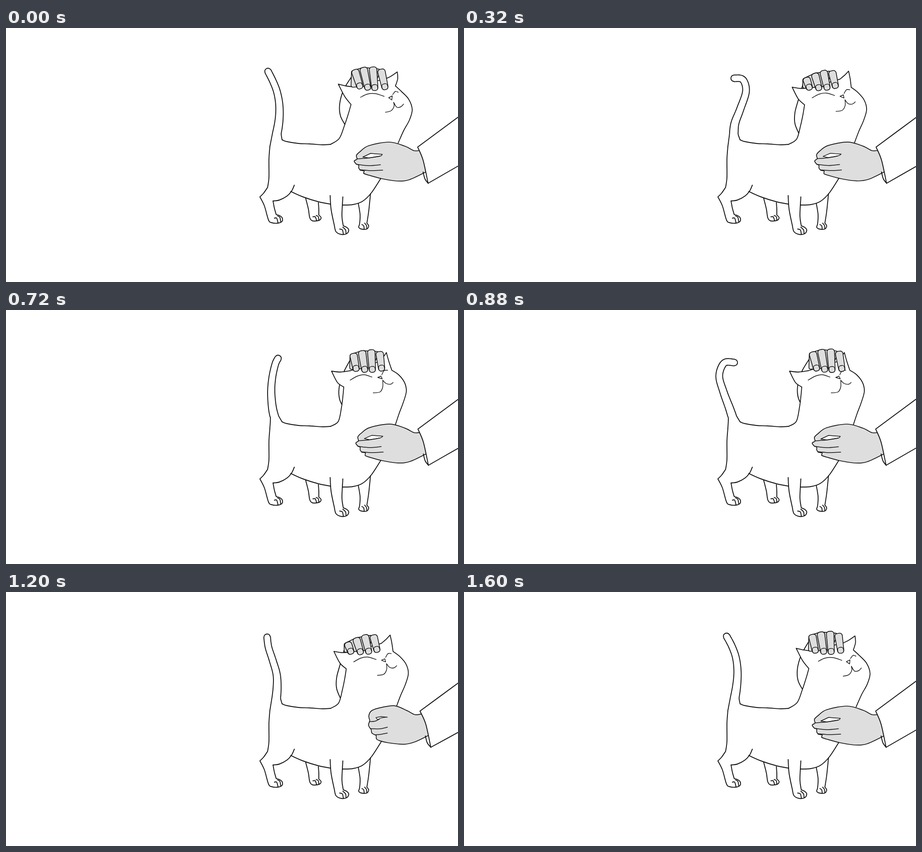
An HTML page with a canvas for the animation above (1.68 s loop, 997 px wide and 561 px high).

```html
<!DOCTYPE html>
<html lang="en">
<head>
<meta charset="utf-8">
<title>Cat being petted</title>
<style>
html, body { margin: 0; width: 100%; height: 100%; overflow: hidden; background: #fff; }
canvas { display: block; }
</style>
</head>
<body>
<canvas id="stage" width="997" height="561"></canvas>
<script>
const ctx = document.getElementById("stage").getContext("2d");
const INK = "#111", SKIN = "#dedede", PAPER = "#fff";
const LOOP = 1680, STEP = 80, PET = LOOP / 2;

// "x,y x,y | x,y": smooth runs of points, "|" marks a corner
const parse = s => s.split("|").map(run =>
  run.trim().split(/\s+/).map(p => p.split(",").map(Number)));
const pair = (from, to) => [parse(from), parse(to)];

const mix = (a, b, k) => Array.isArray(a)
  ? a.map((v, i) => mix(v, b[i], k))
  : a + (b - a) * k;
const ramp = (a, b, t) => Math.min(1, Math.max(0, (t - a) / (b - a)));
const ease = (a, b, t) => (1 - Math.cos(Math.PI * ramp(a, b, t))) / 2;

const body = [
  "582,262 580,290 580,330 577,352 | 568,365 560,373 | 570,393 579,424 586,430 600,431 609,427 609,419 603,414 596,412 | 592,398 589,382",
  "589,382 603,380 620,371 630,360 636,347",
  "592,420 597,420 600,430", "599,415 604,418 606,428",
  "609,247 620,251 645,255 670,256 698,258 716,257",
  "628,361 655,373 690,384 716,389",
  "742,391 765,390 786,383 806,364 830,327",
  "661,376 667,400 670,419 676,426 690,425 695,419 690,413 | 690,400 689,386",
  "677,417 682,417 685,425", "684,414 689,417 690,424",
  "715,370 717,400 724,435 728,450 740,456 752,454 756,446 751,440 744,437 | 741,415 743,373",
  "736,444 742,446 744,455", "743,440 749,446 750,454",
  "777,387 781,412 780,432 778,440 784,444 796,444 800,437 796,431 | 800,405 804,366",
  "785,434 789,437 790,444", "791,431 795,436 796,443"
].map(parse);

// Head turned right and left
const skull = pair(
  "716,257 735,244 746,217 755,190 761,169 | 747,151 733,124 | 750,128 766,130 | 838,112 | 850,106 863,97 | 864,112 859,128 | 872,140 888,157 896,180 890,203 877,227 865,254",
  "716,257 733,246 740,215 743,192 745,170 | 731,160 718,135 | 738,137 760,134 | 823,114 | 832,104 839,94 | 844,112 851,133 | 866,143 879,160 883,180 876,205 867,229 859,253");
const face = [
  pair("782,153 797,146 815,145 834,151", "759,155 775,146 790,143 807,148"),
  pair("853,147 859,140 865,142", "829,143 834,134 842,133"),
  pair("844,154 | 852,150 | 851,159 | 844,154", "820,149 | 827,146 | 830,152 | 820,149"),
  pair("837,186 849,183 856,173 855,164 | 862,175 871,174 877,168",
    "810,183 825,181 831,170 831,155 | 838,162 848,164 854,160")
];

// Stroking hand, forward and back
const arm = pair("762,108 745,136 736,168 738,195 752,220", "748,118 737,160 729,190 729,215 740,242");
const roots = pair("769,92 788,87 809,86 827,91", "752,112 771,102 790,95 809,95");
const tips = pair("782,134 799,137 814,138 837,136", "762,137 783,138 801,137 819,133");
const heel = pair("761,131", "745,134");

// Lower hand, open and closed
const fist = pair(
  "916,270 900,271 880,261 845,252 800,260 781,273 773,281 774,287 | 774,290 768,294 773,301 | 778,303 778,309 781,314 | 790,316 789,321 800,325 830,333 863,338 890,335 928,317",
  "921,268 903,271 885,262 858,251 825,256 810,261 805,272 807,282 | 807,284 805,294 809,302 | 810,303 812,312 820,316 | 821,317 822,325 828,329 845,333 881,336 905,330 936,315");
const gap = pair("787,285 | 804,277 | 830,279 | 825,283 800,287 | 787,285",
  "821,276 | 832,275 | 843,276 | 830,277 823,281 | 821,276");
const creases = [
  pair("774,289 800,287 825,283", "807,286 817,285 824,280"),
  pair("773,301 800,304 826,302", "809,302 828,302 844,298"),
  pair("781,313 805,315 831,314", "820,316 832,314 843,311")
];
const sleeve = pair("997,197 | 908,263 | 920,292 931,343 | 997,305", "997,202 | 914,263 | 927,292 938,343 | 997,311");
const lining = pair("920,318 924,333 931,343", "926,318 930,333 938,343");

// Middle line of the tail above its base
const TAIL_BASE = [595, 246];
const tailKeys = [
  [0, "602,206 603,172 598,142 589,118 578,96"],
  [320, "597,213 609,180 622,140 615,114 596,111"],
  [560, "590,218 598,182 612,152 614,122 604,98"],
  [880, "586,218 572,180 563,145 574,117 596,116"],
  [1200, "598,212 597,182 588,150 579,122 576,100"],
  [1440, "600,212 604,182 603,150 594,122 582,102"]
].map(([t, s]) => [t, parse(s)[0]]);
tailKeys.push([LOOP, tailKeys[0][1]]);

// Bezier control points for the stretch from p[i] to p[i + 1]
function stretch(p, i) {
  const b = p[i], c = p[i + 1], a = p[i - 1] || b, d = p[i + 2] || c;
  return [b, b.map((v, n) => v + (c[n] - a[n]) / 6), c.map((v, n) => v - (d[n] - b[n]) / 6), c];
}

function curve(runs) {
  const path = new Path2D();
  let last = null;
  for (const run of runs) {
    const p = last ? [last, ...run] : run;
    if (!last) path.moveTo(...p[0]);
    for (let i = 0; i < p.length - 1; i++) path.bezierCurveTo(...stretch(p, i).slice(1).flat());
    last = p[p.length - 1];
  }
  return path;
}

function along(p, u) {
  const x = u * (p.length - 1), i = Math.min(Math.floor(x), p.length - 2);
  let q = stretch(p, i);
  while (q.length > 1) q = q.slice(1).map((v, n) => mix(q[n], v, x - i));
  return q[0];
}

function tailOutline(t) {
  const i = tailKeys.findIndex(key => key[0] > t) - 1;
  const [[t0, from], [t1, to]] = [tailKeys[i], tailKeys[i + 1]];
  const spine = [TAIL_BASE, ...mix(from, to, (t - t0) / (t1 - t0))];
  const left = [], cap = [], right = [];
  for (let u = 0.08; u <= 1.001; u += 0.04) {
    const [x, y] = along(spine, Math.min(u, 1));
    const [px, py] = along(spine, u - 0.02);
    const dir = Math.atan2(y - py, x - px), w = 7.3 + 3 * (1 - u) ** 3;
    const edge = turn => [x + w * Math.cos(dir + turn), y + w * Math.sin(dir + turn)];
    left.push(edge(-Math.PI / 2));
    right.unshift(edge(Math.PI / 2));
    cap.splice(0, 3, edge(-Math.PI / 4), edge(0), edge(Math.PI / 4));
  }
  return curve([[[582, 262], ...left, ...cap, ...right, [609, 247]]]);
}

function rounded(pts, r) {
  const path = new Path2D(), n = pts.length;
  path.moveTo(...mix(pts[n - 1], pts[0], 0.5));
  pts.forEach((p, i) => path.arcTo(...p, ...pts[(i + 1) % n], r));
  path.closePath();
  return path;
}

function ink(path, fill, width = 1.9) {
  if (fill) {
    ctx.fillStyle = fill;
    ctx.fill(path);
  }
  ctx.lineWidth = width;
  ctx.stroke(path);
}

function finger(root, tip) {
  const len = Math.hypot(tip[0] - root[0], tip[1] - root[1]);
  const nx = (tip[1] - root[1]) / len, ny = (root[0] - tip[0]) / len;
  const band = (k, w) => {
    const [x, y] = mix(root, tip, k);
    return [[x - nx * w, y - ny * w], [x + nx * w, y + ny * w]];
  };
  const end = band(1, 6.8).reverse();
  ink(rounded([...band(0, 8.5), ...end], 6), SKIN, 1.6);
  ink(rounded([...band(1 - 13 / len, 6), ...end], 5), SKIN, 1.4);
}

function draw(time) {
  const t = Math.floor((time % LOOP) / STEP) * STEP;
  const pet = t % PET;
  const turn = ease(0, 560, t) - ease(880, LOOP, t);
  const back = (1 - Math.cos(2 * Math.PI * pet / PET)) / 2;
  const grip = ease(300, 380, pet) - ease(560, 760, pet);
  const at = ([from, to], k) => mix(from, to, k);
  const shape = (part, k) => curve(at(part, k));

  ctx.fillStyle = PAPER;
  ctx.fillRect(0, 0, 997, 561);
  ctx.strokeStyle = INK;
  ctx.lineJoin = ctx.lineCap = "round";

  ink(shape(arm, back));
  ink(shape(skull, turn), PAPER, 1.8);
  face.forEach(part => ink(shape(part, turn), null, 1.4));
  body.forEach(part => ink(curve(part)));
  ink(tailOutline(t));

  const [root] = at(roots, back), [tip] = at(tips, Math.sqrt(back)), [[low]] = at(heel, back);
  ink(rounded([[root[0][0] - 7, root[0][1] + 3], root[1], root[3], mix(root[2], tip[2], 0.8), low], 4), SKIN, 1.6);
  root.forEach((p, i) => finger(p, tip[i]));

  ink(shape(fist, grip), SKIN, 1.7);
  ink(shape(gap, grip), PAPER, 1.4);
  creases.forEach(part => ink(shape(part, grip), null, 1.5));
  ink(shape(sleeve, grip), PAPER);
  ink(shape(lining, grip));
}

function tick() {
  draw(performance.now());
  requestAnimationFrame(tick);
}
tick();
</script>
</body>
</html>
```
